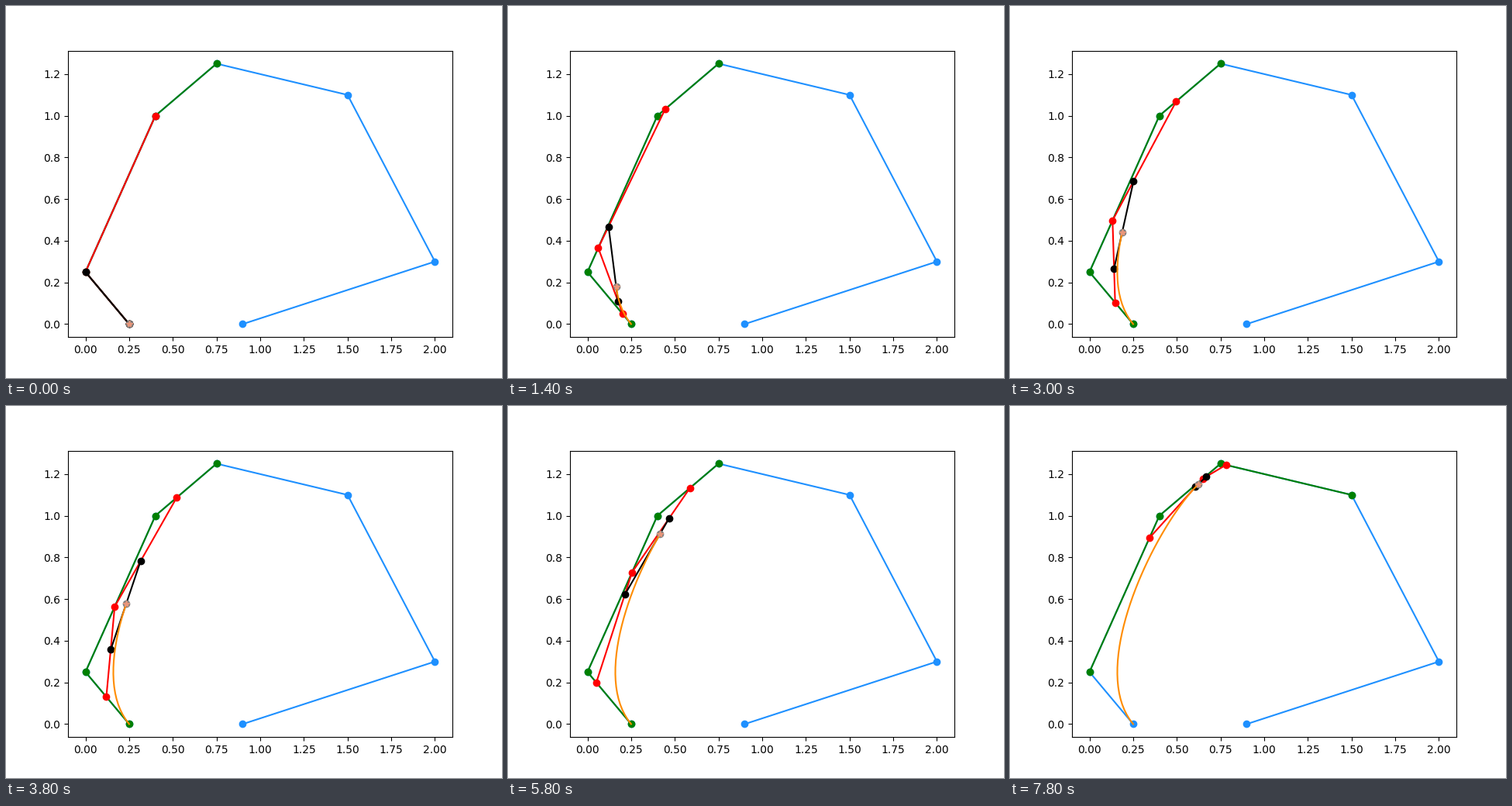
Animation of 640x480 px, one loop 8 s. Source, as a matplotlib script:

```python
import numpy as np
import matplotlib.pyplot as plt
from matplotlib.animation import FuncAnimation

DEGREE = 3
FRAMES = 40
CONTROL = np.array([(0.25, 0), (0, 0.25), (0.4, 1), (0.75, 1.25),
                    (1.5, 1.1), (2, 0.3), (0.9, 0)])

# Clamped knots: each knot equals its index, pinned at both ends.
COUNT = len(CONTROL) + DEGREE + 1
KNOTS = np.arange(COUNT)
KNOTS[:DEGREE + 1] = 0
KNOTS[-DEGREE - 1:] = COUNT
STEP = COUNT / 100


def de_boor(u):
    """Return the points of every de Boor level at parameter u."""
    span = np.searchsorted(KNOTS, u, side="right") - 1
    levels = [CONTROL[span - DEGREE:span + 1]]
    for r in range(1, DEGREE + 1):
        i = np.arange(span - DEGREE + r, span + 1)
        start, end = KNOTS[i], KNOTS[i + DEGREE + 1 - r]
        a = ((u - start) / (end - start))[:, None]
        prev = levels[-1]
        levels.append((1 - a) * prev[:-1] + a * prev[1:])
    return levels


curve = np.array([de_boor(STEP * k)[-1][0] for k in range(FRAMES)])

fig, ax = plt.subplots(figsize=(6.4, 4.8), dpi=100)
ax.plot(*CONTROL.T, "o-", color="dodgerblue")
ax.autoscale_view()
ax.autoscale(False)

level_lines = [ax.plot([], [], "o-", color=c)[0]
               for c in ("green", "red", "black", "grey")]
trace, = ax.plot([], [], color="darkorange")
star, = ax.plot([], [], "*", color="darksalmon")


def update(k):
    levels = de_boor(STEP * k)
    for line, pts in zip(level_lines, levels):
        line.set_data(*pts.T)
    trace.set_data(*curve[:k + 1].T)
    star.set_data(*levels[-1].T)
    return [*level_lines, trace, star]


anim = FuncAnimation(fig, update, frames=FRAMES, interval=200,
                     repeat=True, repeat_delay=0)
plt.show()
```
